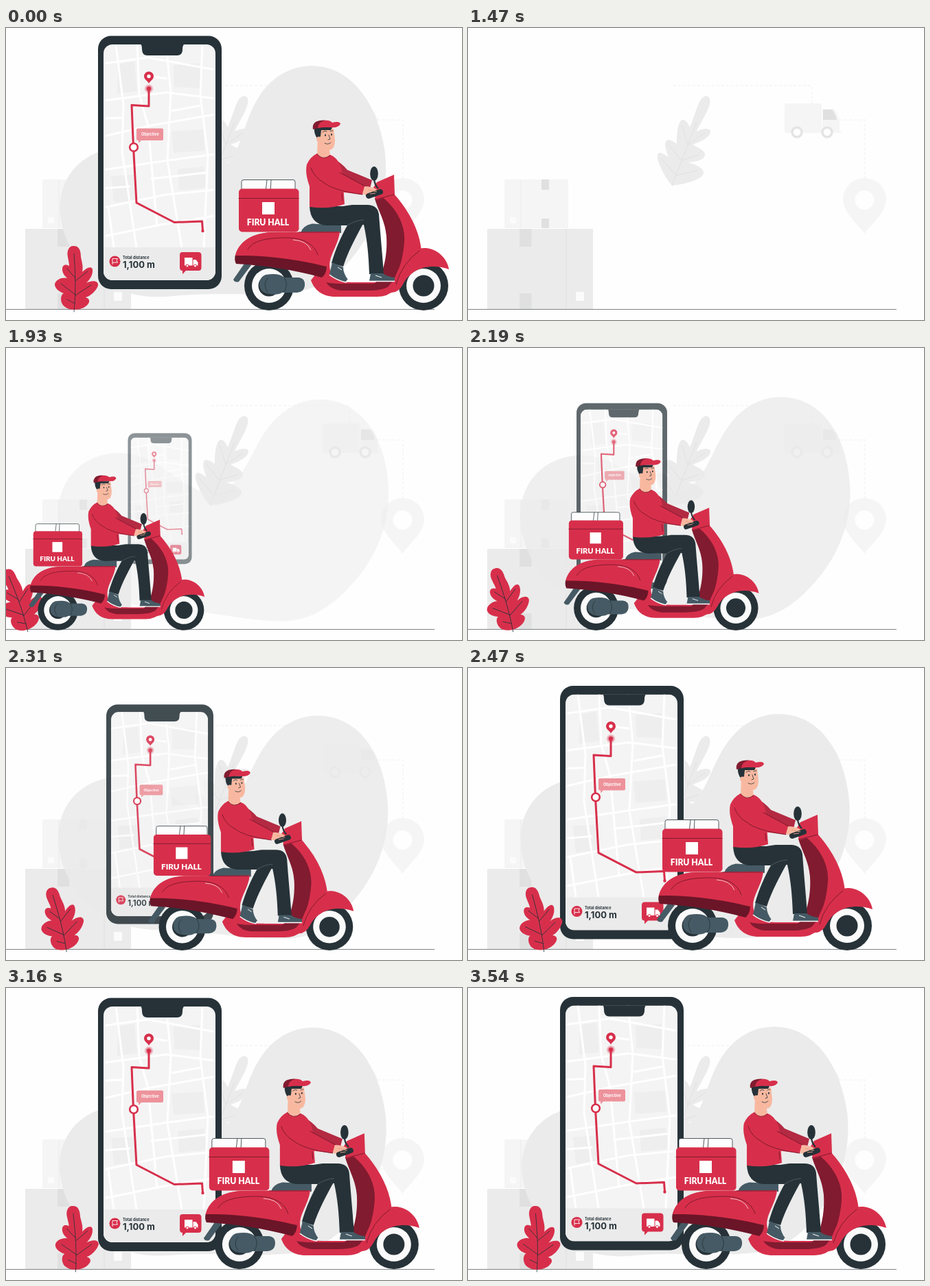
Write an HTML page that moves like this. It is 664 px wide and 426 px high and loops after 3620 ms.

```html
<!DOCTYPE html>
<html lang="en">
<head>
<meta charset="utf-8">
<title>Delivery</title>
<style>
html, body { margin: 0; width: 100%; height: 100%; overflow: hidden; background: #fefefe; }
svg { display: block; width: 664px; height: 426px; }
text { font-family: Inter, "Open Sans", sans-serif; font-weight: 700; }
.red { fill: #d72f4b; }
.maroon { fill: #811b30; }
.ink { fill: #263238; }
.slate { fill: #455a64; }
.skin { fill: #f8b8a0; }
.white { fill: #fff; }
.g1 { fill: #f5f5f5; }
.g2 { fill: #ebebeb; }
.g3 { fill: #e0e0e0; }
.line { fill: none; stroke: #263238; stroke-width: .8; stroke-linecap: round; stroke-linejoin: round; }
.crease { fill: none; stroke: #76172b; stroke-width: .9; stroke-linecap: round; }
</style>
</head>
<body>
<svg viewBox="0 0 664 426">
  <defs>
    <radialGradient id="glow">
      <stop offset=".3" stop-color="#d72f4b" stop-opacity=".75"/>
      <stop offset="1" stop-color="#d72f4b" stop-opacity="0"/>
    </radialGradient>
    <clipPath id="screen"><rect x="142" y="24" width="163" height="344" rx="13"/></clipPath>
    <g id="wheel">
      <circle class="ink" r="36"/>
      <circle r="25" fill="#fafafa"/>
      <circle class="ink" r="15.500"/>
    </g>
  </defs>

  <!-- pale backdrop -->
  <g>
    <rect class="g1" x="53" y="221" width="93" height="71"/>
    <path class="g3" d="M107 221h11v15h-11zM107 278h11v14h-11z"/>
    <path d="M77 221v71" stroke="#ebebeb"/>
    <rect x="61" y="276" width="9" height="9" fill="#fbfbfb"/>
    <rect class="g2" x="28" y="293" width="154" height="118"/>
    <path class="g3" d="M75 293h17.500v26h-17.500zM75 387h17.500v24h-17.500z"/>
    <path d="M143 293v118" stroke="#e0e0e0"/>
    <rect x="157" y="385" width="12" height="13" fill="#fbfbfb"/>
    <path class="g2" d="M297 230C290 222 284 211 279 200C275 190 274 182 280 182C284 182 289 187 292 188
      C288 178 285 168 289 164C294 161 301 167 304 169C304 156 305 137 312 134C318 133 321 141 323 145
      C328 133 333 115 338 106C342 98 350 97 352 103C354 112 347 124 341 135C338 141 334 147 333 151
      C341 147 350 145 353 150C354 158 340 166 327 170C335 175 345 178 345 185C344 193 331 195 321 196
      C331 199 344 204 343 212C340 222 315 228 297 230Z"/>
    <path d="M297 230L333 137M303 215L281 190M303 215L334 208M311 193L291 169M311 193L336 185M320 170L311 142M320 170L345 153"
      fill="none" stroke="#dedede" stroke-width=".8"/>
    <path d="M299 84H501V110M541 134H578V220" fill="none" stroke="#f2f2f2" stroke-width="1.200" stroke-dasharray="4 3"/>
    <path class="g1" d="M461 110h54v43h-54zM516 118h16q5 3 9 16v16h2v3h-27z"/>
    <path class="g3" d="M517 119h13q5 5 7 15h-20z"/>
    <g fill="#fff" stroke="#e4e4e4" stroke-width="3.500">
      <circle cx="479" cy="152" r="7"/><circle cx="523" cy="152" r="7"/>
    </g>
    <path class="g1" d="M577.500 300C571 289 546 270 546 250A31.500 31 0 0 1 609 250C609 270 584 289 577.500 300Z"/>
    <circle cx="577.500" cy="251" r="14" fill="#fefefe"/>
  </g>

  <path id="blob" class="g2" d="M76 239C78 191 113 154 166 154C226 155 259 213 301 211C346 206 353 151 383 113
    C404 86 431 74 456 74C523 74 557 141 557 214C556 268 533 312 505 343C475 377 443 398 402 398
    C345 398 285 381 215 379C130 374 74 310 76 239Z"/>
  <path d="M0 410.500H624" stroke="#7f8588"/>

  <g id="phone">
    <rect class="ink" x="134" y="11.500" width="180" height="369.500" rx="19"/>
    <g clip-path="url(#screen)">
      <rect x="142" y="24" width="163" height="344" fill="#f4f4f4"/>
      <path fill="#eee" d="M163 53l24-4 4 43-29 4zM244 54l38-3 2 37-39-2zM241 151l46-3 2 31-45 3zM153 216l32-2 3 37-31 4zM250 206l38-4 4 31-40 4z"/>
      <g id="streets" fill="none" stroke="#fff" stroke-width="3"></g>
      <rect x="142" y="320" width="163" height="48" class="g2"/>
      <path class="ink" d="M196 23h64q-3 2-3 8q0 9-8 9h-43q-8 0-8-9q0-6-2-8z"/>
    </g>
    <path d="M208 88V114L183 112.500L185.500 174L190 255L245 283.500L285.500 282L286.500 296" fill="none"
      stroke="#d72f4b" stroke-width="3" stroke-linejoin="round"/>
    <circle class="red" cx="286.500" cy="296" r="2.200"/>
    <circle cx="208" cy="88.500" r="7" fill="url(#glow)"/>
    <circle class="red" cx="208" cy="88.500" r="3"/>
    <path class="red" d="M208 81C206 77 201 75 201 70.500A7 7 0 0 1 215 70.500C215 75 210 77 208 81Z"/>
    <circle class="white" cx="208" cy="70.500" r="2.700"/>
    <circle cx="186" cy="174" r="5.800" fill="#fff" stroke="#d72f4b" stroke-width="2.600"/>
    <path fill="#ed929b" d="M192 146.500h35q2 0 2 2v13.500q0 2-2 2h-30l-4 4v-4q-3 0-3-2v-13.500q0-2 2-2z"/>
    <text class="white" x="197" y="157.300" font-size="5.500">Objective</text>
    <circle class="red" cx="158.500" cy="340.500" r="8"/>
    <path d="M155 345v-8.500h7.500l-1.500 2.800 1.500 2.800h-7.500" fill="none" stroke="#fff" stroke-width=".9"/>
    <text class="ink" x="170" y="337" font-size="5.600">Total distance</text>
    <text class="ink" x="170" y="350" font-size="13">1,100 m</text>
    <path class="red" d="M257 327h23q4.500 0 4.500 4.500v18q0 4.500-4.500 4.500h-18l-5 5v-5q-4 0-4-4.500v-18q0-4.500 4-4.500z"/>
    <path class="white" d="M260 335h11.500v11.500h-11.500zM272.500 338h4l3 4v4.500h-7z"/>
    <g fill="#fff" stroke="#d72f4b"><circle cx="264" cy="347" r="2"/><circle cx="275.500" cy="347" r="2"/></g>
  </g>

  <!-- local origin: the foot of the stem -->
  <g id="plant">
    <path class="red" d="M0-93C-7-94-11-86-9-77C-8-71-7-68-7-64C-12-67-17-66-17-59C-17-53-13-49-10-46
      C-15-48-27-45-28-37C-28-30-19-25-15-24C-21-21-20-8-13-4C-9-1-3 0 1 0C10 0 19-4 22-11
      C23-15 20-17 17-18C24-20 32-27 35-35C36-43 26-43 18-39C23-44 28-51 27-59C25-65 17-60 12-55
      C14-63 11-71 10-77C10-87 7-93 0-93Z"/>
    <path class="line" d="M0 3C3-25 2-55 0-82M2-22L-19-38M2-21L25-36M2-46L-10-60M2-42L20-56M1-9L-10-15"/>
  </g>

  <!-- local origin: where the front wheel meets the road -->
  <g id="scooter"><g transform="translate(-608 -411)">
    <path class="slate" d="M349 341l8 5-18 24q-6 2-8-3z"/>
    <use href="#wheel" x="383" y="376"/>
    <use href="#wheel" x="608" y="376"/>

    <!-- parcel box -->
    <g fill="#fdfdfd" stroke="#263238" stroke-width=".8">
      <rect x="343" y="221.500" width="78" height="18" rx="3"/>
      <path d="M380 221.500l-2 18M386 221.500l-1 18"/>
    </g>
    <rect class="red" x="339" y="234.500" width="87.500" height="63" rx="5"/>
    <path class="crease" d="M339 248.500H426"/>
    <rect class="white" x="373" y="254" width="18" height="18"/>
    <text class="white" x="381.500" y="288" text-anchor="middle" font-size="12.200" style="font-family:Lato,sans-serif;font-weight:900">FIRU HALL</text>

    <!-- far arm, body, floor -->
    <path d="M474 189Q488 196 497 207L533 222L530 234L490 229Z" fill="#b32a42"/>
    <path class="slate" d="M429 299Q432 288 446 285.500L488 288V299Z"/>
    <path class="red" d="M334 332C338 316 352 300 385 298L486 297C484 320 464 338 474 358C480 370 490 371 510 371H545
      C556 350 558 310 551 285L537 248L565 242C590 270 603 300 605 326C586 338 575 360 566 382Q556 392 540 392H480
      C460 392 449 382 444 368L462 345Z"/>
    <path class="maroon" d="M537 249L547 246C568 262 582 287 580 312C578 340 570 363 557 377Q548 383 526 383H488Q472 381 466 371
      Q475 373 490 373H536C548 365 556 334 554 304C552 281 542 267 537 249Z"/>
    <path fill="#6b1528" d="M334 331C370 330 420 336 467 347Q467 358 460 364C420 353 375 346 335 344Q332 338 334 331Z"/>
    <path class="red" d="M334 332C338 316 352 301 385 298H430C452 299 467 321 467 348C420 336 370 331 334 332Z"/>
    <path class="crease" d="M352 323C359 311 377 306 410 306Q446 307 454 331"/>
    <path d="M418 309Q438 310 444 324" fill="none" stroke="#f5c3ca"/>
    <path class="crease" d="M427 298H484"/>
    <path class="slate" d="M378 360Q398 357 405 364H426Q436 365 435 376Q434 385 424 386H402Q396 390 383 388Q370 386 369 375Q369 363 378 360Z"/>
    <path class="line" d="M381 365Q373 374 381 385M405 364Q412 374 405 385"/>

    <!-- front fender, head, mirror -->
    <path class="red" d="M560 386C568 350 585 321 610 321C630 322 643 338 645 352C619 343 591 349 578 374Q571 387 560 386Z"/>
    <path class="crease" d="M568 374Q576 344 602 325"/>
    <path class="red" d="M533 236L540 225L565 214L566 243L539 251Z"/>
    <path class="crease" d="M539 250L565 243"/>
    <path d="M536 221Q537 229 542 234" fill="none" stroke="#263238" stroke-width="2.200"/>
    <ellipse class="ink" cx="536" cy="212.500" rx="5.800" ry="10.500"/>

    <!-- legs and shoes -->
    <path class="ink" d="M442 260H500L522 282C510 304 498 326 491 348L474 343C480 322 488 304 497 288H466Q443 286 442 260Z"/>
    <path class="slate" d="M475 342L491 349Q491 358 498 367L495 371Q481 368 471 360Z"/>
    <path d="M471 360Q481 368 495 371L498 367" fill="none" stroke="#fff" stroke-width="1.500"/>
    <path class="ink" d="M470 263L504 258H526Q541 258 543 272C545 300 548 330 550 359H529C528 330 526 310 521 287H470Z"/>
    <path class="slate" d="M531 358H549Q556 363 566 364V369H529Z"/>
    <path d="M529 369.500H566" stroke="#fff" stroke-width="1.500"/>
    <path d="M483 349l6 4M538 361l9 3" stroke="#fff"/>
    <path d="M497 288Q510 280 521 280" fill="none" stroke="#4c5a60"/>

    <!-- upper body -->
    <path class="skin" d="M454 158L453 186Q461 195 472 187L471 178Q479 177 479 163L477 147L455 145Z"/>
    <path class="red" d="M453 183Q461 195 472 185Q482 188 488 203Q492 218 491 230L493 257Q470 265 442 261L442 231Q435 212 438 199Q443 188 453 183Z"/>
    <path class="red" d="M460 203Q474 197 490 213L523 231L519 243L486 239Q470 235 461 218Z"/>
    <path class="crease" d="M444 204Q449 218 462 225Q476 237 519 243M486 211L523 231M453 184Q461 194 472 186M489 241L490 252"/>
    <path class="skin" d="M522 231Q532 231 539 235Q544 239 538 243Q528 247 519 242Z"/>
    <path d="M528 245L545 239" stroke="#263238" stroke-width="8" stroke-linecap="round"/>
    <path d="M527 236L540 239M530 242L538 241" stroke="#e39d87" fill="none"/>
    <path class="ink" d="M449 145L475 145L473 149L459 149L458 158L454 162Q448 155 449 145Z"/>
    <circle class="skin" cx="455.500" cy="162" r="3.500"/>
    <path class="ink" d="M464 156.500a1 1.400 0 1 0 2 0a1 1.400 0 1 0-2 0M473 155.500a1 1.400 0 1 0 2 0a1 1.400 0 1 0-2 0"/>
    <path class="line" d="M461 152Q464 149 467 151M472 151Q474 149 476 150M470 156L472 162L469 163M464 168Q469 171 473 167"/>
    <path class="maroon" d="M447 148Q445 137 457 135Q469 133 474 140L476 145Q460 144 447 148Z"/>
    <path class="red" d="M454 146Q455 137 464 135Q471 134 475 138Q486 135 487 140Q484 146 474 145Q462 144 454 146Z"/>
  </g></g>
</svg>
<script>
const LOOP = 3620, REST = 1470, STEP = 230 / 3, LAST = 28;
const byId = id => document.getElementById(id);
const [blob, phone, plant, scooter] = ["blob", "phone", "plant", "scooter"].map(byId);

const streets = [
  "M142 52L206 43L305 61", "M142 106L234 94L305 103", "M142 158L207 143L305 126",
  "M142 207L230 194L305 184", "M142 262L233 243L305 236", "M142 304L225 287L305 274",
  "M160 24L171 112L169 180L190 320", "M191 24L194 97L207 143L220 290", "M233 24L240 94L235 194L256 320",
  "M286 24L283 99L294 186L288 320", "M142 132L170 131M207 70L235 74M241 121L284 113",
  "M142 234L181 231M211 220L291 211M149 262L157 320"
];
byId("streets").innerHTML = streets.map(d => `<path d="${d}"/>`).join("");

// [step, value] tables, linear between points
const ride = [[0, -45], [6, 259], [9, 390], [13, 552], [27, 572], [LAST, 608]];
const near = [[0, .66], [6, .815], [9, .904], [13, 1], [LAST, 1]];
const bob = [[0, 0], [13, 0], [22, -2], [27, -2], [LAST, 0]];
const grow = [[0, 0], [6, .517], [9, .733], [13, 1], [LAST, 1]];
const settle = [[0, 1.25], [22, .12], [27, .06], [LAST, 0]];

function at(table, k) {
  const i = Math.max(1, table.findIndex(p => p[0] >= k));
  const [k0, v0] = table[i - 1], [k1, v1] = table[i];
  return v0 + (v1 - v0) * (k - k0) / (k1 - k0);
}

function pose(k) {
  const sway = at(settle, k);
  const size = at(grow, k);
  const plantX = 99 + 19 * sway - 12.3 * Math.max(0, 13 - k);

  blob.setAttribute("opacity", size);
  blob.setAttribute("transform", `rotate(${8.9 * sway - 8} 317 235)`);
  phone.setAttribute("opacity", size);
  phone.setAttribute("transform",
    `translate(224 ${196 + 25 * sway}) scale(${size}) translate(-224 -196)`);
  plant.setAttribute("transform", `translate(${plantX} 411) rotate(${-20 * sway})`);
  scooter.setAttribute("transform",
    `translate(${at(ride, k)} ${411 + at(bob, k)}) scale(${at(near, k)})`);
}

const start = performance.now();
function tick() {
  const t = (performance.now() - start) % LOOP;
  pose(t < REST ? LAST : Math.min(LAST - 1, Math.floor((t - REST) / STEP + .1)));
  requestAnimationFrame(tick);
}
tick();
</script>
</body>
</html>
```
